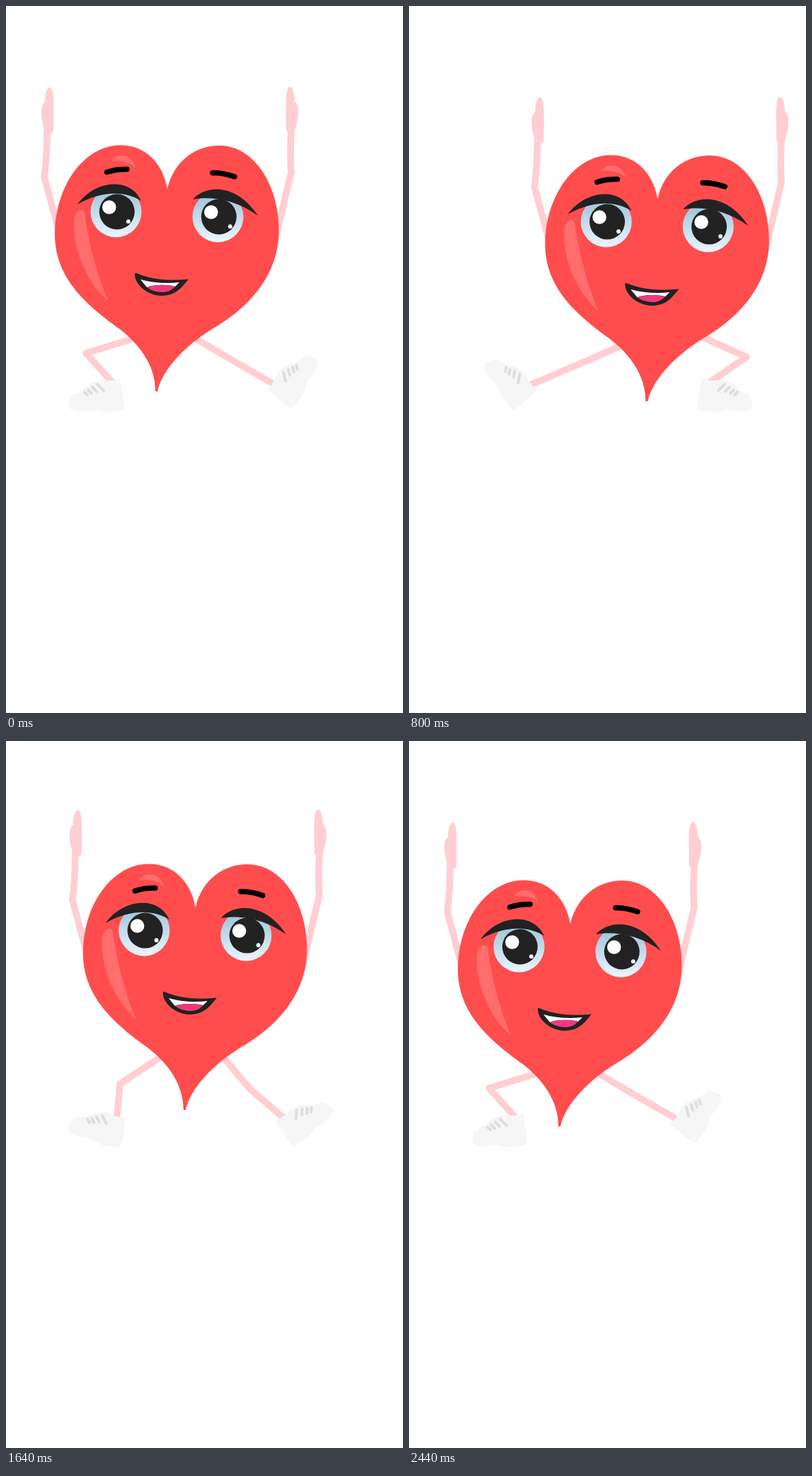
These frames come from a looping animation (561 by 998 pixels, 2480 ms). An HTML page:

```html
<!DOCTYPE html>
<html lang="en">
<head>
<meta charset="utf-8">
<title>Dancing heart</title>
<style>
html, body { margin: 0; width: 100%; height: 100%; overflow: hidden; background: #fff; }
svg { display: block; width: 561px; height: 998px; }
.limb { fill: none; stroke: #ffced2; stroke-width: 9.5; stroke-linejoin: round; stroke-linecap: round; }
</style>
</head>
<body>
<svg viewBox="0 0 561 998">
  <defs>
    <linearGradient id="iris" x1="0" y1="0" x2="0" y2="1">
      <stop offset=".1" stop-color="#9fc6da"/>
      <stop offset="1" stop-color="#edf5ff"/>
    </linearGradient>
    <path id="hand" fill="#ffced2" d="M62 115C67 116 67.500 132 67.500 146L67 176Q66 181 61 180L56 180C53 172 50 160 50 150C50 142 52 138 55 136C55 128 57 115 62 115Z"/>
    <g id="eye">
      <circle r="36" fill="url(#iris)"/>
      <circle cx="1.300" r="25" fill="#222"/>
      <circle cx="-9.700" cy="-6.500" r="9.800" fill="#fff"/>
      <circle cx="17.300" cy="13.700" r="2.900" fill="#fff"/>
    </g>
    <g id="shoe">
      <path fill="#f6f6f6" d="M0 0L-1 -15L-6 -44Q-14 -41 -22 -41Q-34 -44 -45 -38Q-53 -36 -57 -29Q-64 -24 -74 -21Q-78 -12 -77 -2Q-67 4 -55 2Q-45 -1 -37 1Q-30 4 -20 3Z"/>
      <path fill="none" stroke="#dedede" stroke-width="4" stroke-linecap="round" d="M-29 -27L-38 -36M-39 -26L-45 -32M-46 -23L-51 -28M-52 -21L-56 -25"/>
    </g>
  </defs>

  <g id="arms">
    <path class="limb" d="M58 176Q58 215 54 241L78 330M403 176Q401 210 403 235L378 340"/>
    <use href="#hand"/>
    <use href="#hand" transform="matrix(-1 0 0 1 463 -1)"/>
  </g>
  <path id="legs" class="limb"/>
  <use id="leftShoe" href="#shoe"/>
  <use id="rightShoe" href="#shoe"/>

  <g id="body">
    <path fill="#ff4d4d" d="M228 258.500C237 217 270 197 301 197C352 197 385.500 254 385.500 317C385.500 384 338 428 297 452.500C262 473 222 508 214 544H211C211 510 192 480 160 455.500C115 423 69 385 69 322C69 255 110 196.500 162 196.500C198 196.500 222 223 228 258.500Z"/>
    <g fill="#ff6d6d">
      <path d="M149 219C153 211 166 208 175 215Q181 220 183 229C176 221 163 217 149 219Z"/>
      <path d="M96 304C97 288 108 284 111 292C116 330 127 375 144 416C115 391 94 345 96 304Z"/>
    </g>
    <path fill="none" stroke="#000" stroke-width="7.500" stroke-linecap="round" d="M142.500 234.500Q156 230 171 230.500M292 235.500Q308 235.500 323 241"/>
    <use href="#eye" x="155.500" y="290.500"/>
    <use href="#eye" x="299.500" y="297.500"/>
    <g fill="#222">
      <path d="M101 280C125 246 175 240 191 275C170 261 135 260 101 280Z"/>
      <path d="M264 273C282 252 326 250 356 296C326 274 290 268 264 273Z"/>
    </g>
    <path fill="#222" d="M184 377C207 387 233 388 258 385.500C247 400 238 409 220 409C200 409 182 393 182 379Q182 376 184 377Z"/>
    <path fill="#fff" d="M190 386C207 391 228 392 245 390L239 396C228 393 210 393 199 397Z"/>
    <path fill="#f0397c" d="M199 397C210 393 228 393 239 396C233 402 228 404 221 404C212 404 204 401 199 397Z"/>
  </g>
</svg>
<script>
const LOOP = 2480, FRAME = 40;
const $ = id => document.getElementById(id);
const mix = (a, b, p) => a + (b - a) * p;

// Eased rise from start to peak, eased fall to end.
function bump(t, start, peak, end) {
  if (t <= start || t >= end) return 0;
  const u = t < peak ? (t - start) / (peak - start) : (end - t) / (end - peak);
  return Math.sin(u * Math.PI / 2) ** 2;
}

// 0 = left stance, 1 = right stance.
function stance(t) {
  if (t < 475) return t / 475;
  if (t < 1220) return 1;
  return Math.max(0, 1 - (t - 1220) / 620);
}

// Places a shoe by its heel and returns the ankle point.
function placeShoe(id, x, y, angle, flip) {
  $(id).setAttribute("transform", `translate(${x} ${y}) rotate(${angle}) scale(${flip} 1)`);
  const a = angle * Math.PI / 180, ax = -17 * flip, ay = -39;
  return [x + ax * Math.cos(a) - ay * Math.sin(a), y + ax * Math.sin(a) + ay * Math.cos(a)];
}

function draw(t) {
  const p = stance(t);
  const jumpRight = bump(t, 0, 300, 480), jumpLeft = bump(t, 1210, 1500, 1840);
  const x = 123.3 * p;
  const y = 14.5 * bump(t, 480, 840, 1200) + 8 * bump(t, 1840, 2140, 2440)
    - 45 * jumpRight - 36 * jumpLeft;
  const lag = 10 * jumpRight + 9 * jumpLeft;

  $("body").setAttribute("transform", `translate(${x} ${y})`);
  $("arms").setAttribute("transform", `translate(${x} ${y + lag})`);

  const arc = 20 * p * (1 - p);
  const leftAnkle = placeShoe("leftShoe", mix(167, 148, p), mix(570, 571, p) + arc, 56 * p, 1);
  const rightAnkle = placeShoe("rightShoe", mix(404, 408, p), mix(568, 570, p) + arc, -60 * (1 - p), -1);
  const leftHip = [x + 182, y + mix(469, 463, p)];
  const rightHip = [x + 262, y + mix(466, 440, p * p)];
  const leftKnee = [113 + 127 * p * (1.25 - 0.25 * p), mix(490, 500, p) + 0.4 * y];
  const rightKnee = [330 + 147 * p * p, mix(506, 490, p) + 0.4 * y];
  $("legs").setAttribute("d",
    `M${leftHip}L${leftKnee}L${leftAnkle}M${rightHip}L${rightKnee}L${rightAnkle}`);
}

function tick() {
  draw(Math.floor(performance.now() % LOOP / FRAME) * FRAME);
  requestAnimationFrame(tick);
}
tick();
</script>
</body>
</html>
```
